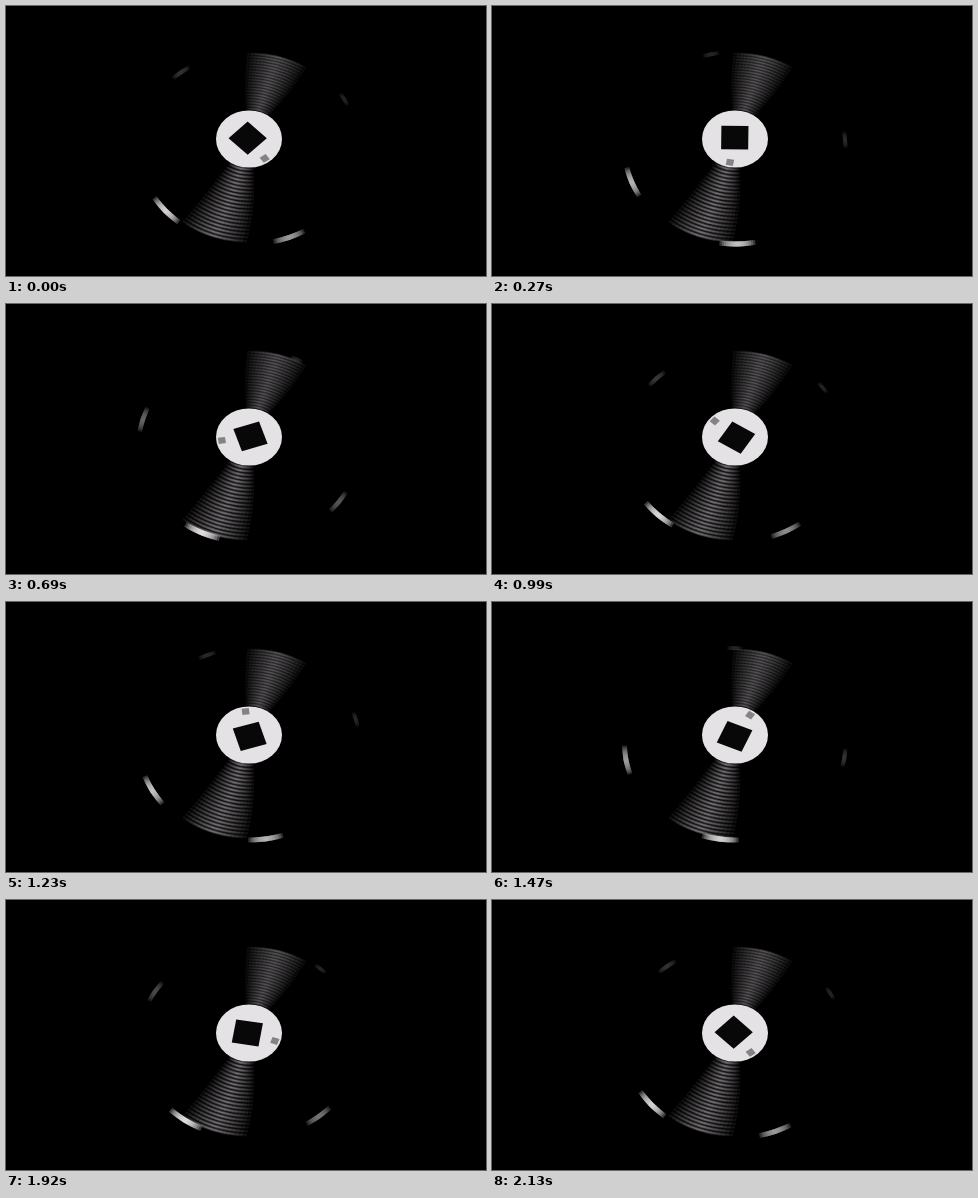
Recreate the animation shown at these times as an HTML page. Size 480 by 270 pixels, loop 2.16 s.

```html
<!DOCTYPE html>
<html lang="en">
<head>
<meta charset="utf-8">
<title>Spinning record</title>
<style>
  html, body { margin: 0; width: 100%; height: 100%; overflow: hidden; background: #000; }
  svg { display: block; width: 100vw; height: 100vh; }
</style>
</head>
<body>
<svg viewBox="0 0 480 270" fill="none">
  <g id="grooves" stroke="#cfcbd0"></g>
  <g id="glints" stroke="#f6f4f6"></g>
  <g transform="translate(243 133) scale(33 28.6)">
    <circle r="1" fill="#e5e2e5"/>
    <g id="label">
      <rect x="-.41" y="-.41" width=".82" height=".82" fill="#080808" transform="translate(-.04 -.03) rotate(45)"/>
      <rect x="-.11" y="-.11" width=".22" height=".22" fill="#848284" transform="rotate(55) translate(.83 0)"/>
    </g>
  </g>
</svg>
<script>
const LOOP = 2160, STEP = 30, SPIN = LOOP - STEP;
const RINGS = 20, LAYERS = 8;
const RAD = Math.PI / 180;
const mix = (a, b, k) => a + (b - a) * k;
const cos = a => Math.cos(a * RAD);
const sin = a => Math.sin(a * RAD);
const byId = id => document.getElementById(id);

function add(parent, tag, attrs = {}) {
  const el = document.createElementNS('http://www.w3.org/2000/svg', tag);
  for (const key in attrs) el.setAttribute(key, attrs[key]);
  return parent.appendChild(el);
}

function arc(cy, rx, ry, mid, half) {
  const point = a => `${(243 + rx * cos(a)).toFixed(2)} ${(cy + ry * sin(a)).toFixed(2)}`;
  return `M${point(mid - half)}A${rx} ${ry} 0 0 1 ${point(mid + half)}`;
}

// Nested translucent arcs fade a highlight towards its ends.
function drawGrooves({ innerMid, outerMid, innerHalf, outerHalf, opacity }) {
  const group = add(byId('grooves'), 'g', { opacity });
  for (let layer = 1; layer <= LAYERS; layer++) {
    let d = '';
    for (let i = 0; i < RINGS; i++) {
      const k = i / (RINGS - 1);
      const half = mix(innerHalf, outerHalf, k) * layer / LAYERS;
      d += arc(mix(133, 141.5, k), mix(35, 107, k), mix(30.5, 93.5, k), mix(innerMid, outerMid, k), half);
    }
    // A broad sheen underneath, a finer groove on top.
    add(group, 'path', { d, 'stroke-width': 3.2, 'stroke-opacity': .045 });
    add(group, 'path', { d, 'stroke-width': 1.5, 'stroke-opacity': .055 });
  }
}
drawGrooves({ innerMid: 286, outerMid: 285.5, innerHalf: 21, outerHalf: 16.5, opacity: .7 });
drawGrooves({ innerMid: 104, outerMid: 109.5, innerHalf: 22, outerHalf: 18.5, opacity: .95 });

const glints = [0, 90, 180, 270].map(start => {
  const group = add(byId('glints'), 'g');
  const arcs = Array.from({ length: LAYERS }, () => add(group, 'path', { 'stroke-opacity': .25 }));
  return { start, group, arcs };
});

function drawGlint({ start, group, arcs }, turn) {
  const a = start + turn;
  // The tilted disc makes the glints bunch up along the lower edge.
  const mid = a + 57.3 + 8.3 * cos(a) - 5.2 * sin(a) + 3 * cos(2 * a) + 1.2 * sin(2 * a);
  const light = .5 + .5 * cos(mid - 120);
  group.setAttribute('opacity', .16 + .84 * light ** 2.2);
  group.setAttribute('stroke-width', 3.4 + 1.8 * light);
  arcs.forEach((path, i) => {
    path.setAttribute('d', arc(142, 110.5, 96, mid, (3.5 + 6.3 * light) * (i + 1) / LAYERS));
  });
}

function render(time) {
  const t = Math.floor(time % LOOP / STEP) * STEP;
  const angle = 360 * t / SPIN;
  byId('label').setAttribute('transform', `rotate(${angle})`);
  glints.forEach(glint => drawGlint(glint, angle / 2));
}

let begin;
function tick(now) {
  begin ??= now;
  render(now - begin);
  requestAnimationFrame(tick);
}
render(0);
requestAnimationFrame(tick);
</script>
</body>
</html>
```
